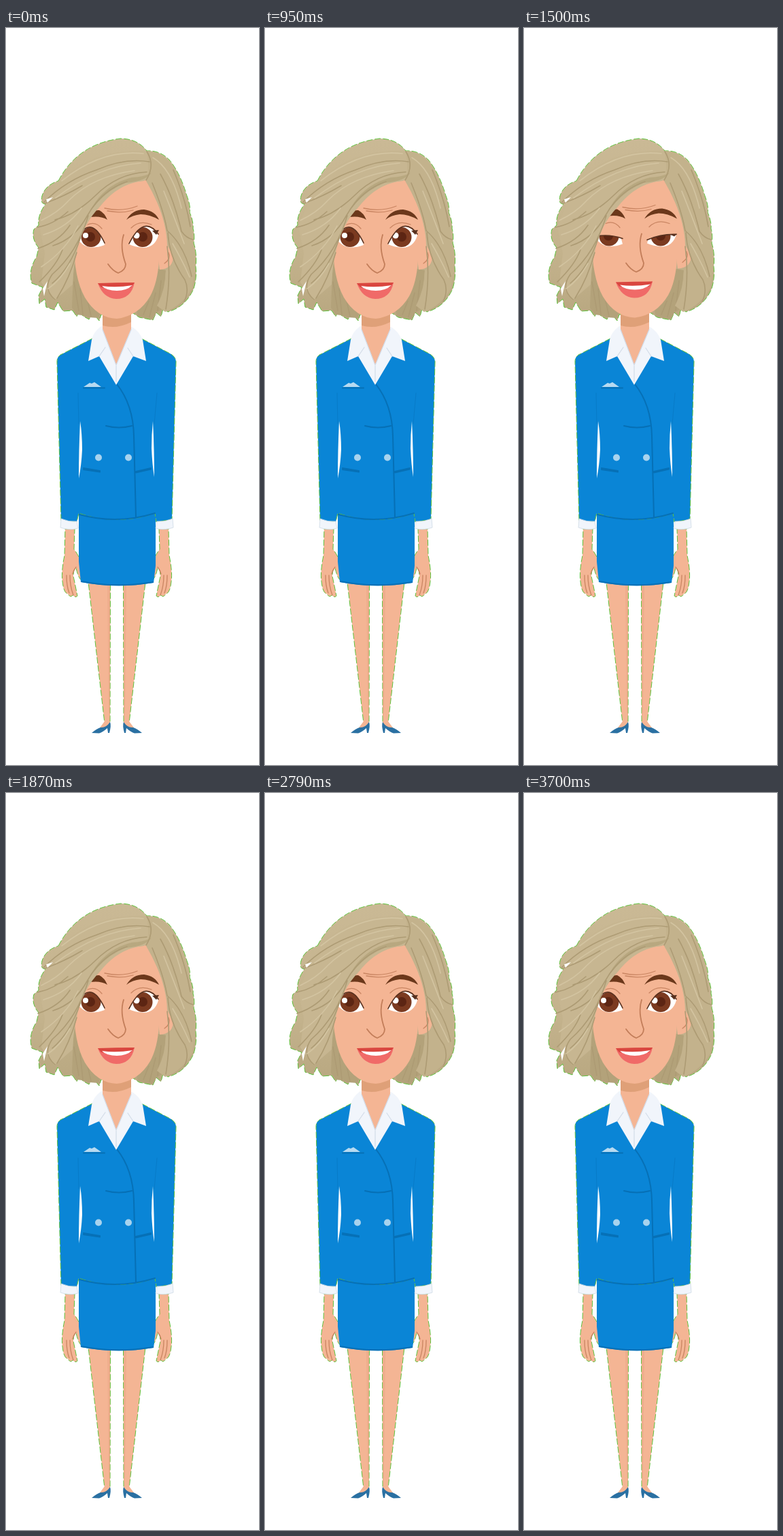
These frames come from a looping animation (372x1080 px, 3.8 s). An HTML page:

```html
<!DOCTYPE html>
<html lang="en">
<head>
<meta charset="utf-8">
<style>
  html, body { margin: 0; width: 100%; height: 100%; overflow: hidden; background: #fff; }
  svg { display: block; width: 100%; height: 100%; }
  .skin { fill: #f4b594; }
  .blue { fill: #0a85d6; }
  .white { fill: #f1f5fb; }
  .line { fill: none; stroke-linecap: round; stroke-linejoin: round; }
  .fringe { stroke: #5fc23c; stroke-width: 1; stroke-dasharray: 9 3; }
  .seam { stroke: #0670b6; stroke-width: 2; }
  .crease { stroke: #c98562; stroke-width: 1.3; }
  .dark { stroke: #ad9b74; stroke-width: 1.6; }
  .light { stroke: #d3c4a1; stroke-width: 1.6; }
</style>
</head>
<body>
<svg viewBox="0 0 372 1080">
  <defs>
    <linearGradient id="hair" x1="0" y1="0" x2="0" y2="1">
      <stop offset="0" stop-color="#cab995"/>
      <stop offset=".6" stop-color="#c4b38d"/>
      <stop offset="1" stop-color="#b8a780"/>
    </linearGradient>
    <g id="limbs">
      <path class="skin fringe" d="M121 812H153.500L153 1019H145Z"/>
      <path d="M149 815H153V1015L151 1000Z" fill="#eaa583" opacity=".5"/>
      <path class="skin fringe" d="M87 734H101L100 764Q110 776 112 794L114 811Q107 810 103 791Q99 793 99 803L105 832Q103 836 98 831Q95 836 91 829Q85 829 83 811Q81 797 86 773Z"/>
      <path class="line crease" d="M89 802Q89 818 93 828M94 802Q94 818 99 831M98 800Q99 795 103 790"/>
      <path class="skin" d="M145 1016L136 1028L152 1024L153 1016Z"/>
      <path d="M126 1033Q133 1027 139 1025Q147 1026 153 1017Q155 1022 152 1033H150L149 1026Q142 1032 137 1033.500Z" fill="#2a70a2"/>
    </g>
  </defs>

  <!-- Back hair -->
  <path class="fringe" fill="url(#hair)" d="M77 224Q105 170 168 162Q193 162 207 180Q226 179 240 193Q256 212 266 246Q272 262 270 270Q276 284 275 294Q278 304 276 315Q281 330 279 350Q281 365 276 382Q264 409 238 416L231 411L228 423L221 417L216 428L196 424L184 416L140 420L137 429L128 418L122 427L113 422L108 413L104 423L98 414L84 415L76 402L71 413L59 409L57 397L49 404L48 392L54 380L38 374Q32 356 45 335L48 322Q37 309 41 295L48 289Q46 275 58 258Q50 258 53 246Q58 230 77 224Z"/>
  <path d="M100 330L97 410L104 420L112 421L122 424L136 425L145 405L190 405L194 422L216 427L221 417L230 412L235 355Z" fill="#b3a27a"/>
  <path class="line dark" d="M100 372L107 414M109 382L113 420M120 400L125 422M228 370L223 414M220 388L211 423M210 400L202 420"/>

  <use href="#limbs"/>
  <use href="#limbs" transform="matrix(-1 0 0 1 326 0)"/>

  <!-- Outfit -->
  <path class="blue" d="M107 708H220V788L217 813Q163 822 110 812L107 782Z"/>
  <path class="line seam" d="M111 811Q163 821 216 812"/>
  <path class="blue fringe" d="M127 455L84 477Q75 480 75 489L81 722L104 724L107 711Q163 730 219 711L221 724L244 720L250 489Q250 483 243 478L199 455L163 500Z"/>
  <path d="M109 576Q112 595 112 618Q111 640 107 660Q107 620 109 576ZM216 576Q214 595 214 616Q215 640 218 658Q218 620 216 576Z" fill="#fff"/>
  <path class="line seam" d="M108 713Q163 728 219 711M163 522Q187 552 188 598L191 717M147 583Q166 588 185 583M114 645L138 649M191 650L213 645"/>
  <path class="line seam" d="M114 647L138 650.500M191 651.500L213 646.500M114 527.500H145"/>
  <path class="line" d="M106 535L107 580M222 535L218 580" stroke="#087bc8"/>
  <path d="M114 526L123 520L126 521L130 519L140 526Z" fill="#b7daf1"/>
  <circle cx="136" cy="629.500" r="5" fill="#a8d3ee"/>
  <circle cx="180" cy="629.500" r="5" fill="#a8d3ee"/>
  <path class="white" id="cuff" d="M81 719Q92 724 104 723L106 733Q94 737 80 732Z" stroke="#cfdae5" stroke-width=".8"/>
  <use href="#cuff" transform="matrix(-1 0 0 1 326 0)"/>

  <!-- Neck and collar -->
  <path class="white" d="M140 437Q128 446 126 457L121 488L137 481L162 523L187 481L206 488L201 457Q196 444 185 438Z"/>
  <path class="skin" d="M142 405H184V442L162 494L142 442Z"/>
  <path d="M142 405H184V431Q162 442 142 436Z" fill="#dfa078"/>
  <path class="line" d="M142 442L162 494L184 442M137 481L146 468M187 481L179 469M162 495V518" stroke="#d3dce8" stroke-width="1.200"/>

  <!-- Face -->
  <g id="face">
    <path class="skin" d="M222 321Q243 313 246 332Q247 353 226 354Z"/>
    <path class="line crease" d="M239 329Q243 338 233 345"/>
    <path class="skin" d="M207 215L150 235L100 300Q98 363 116 395Q134 425 163 426Q195 422 212 393Q223 373 225 340L240 320V270Z"/>
    <path class="line crease" d="M145 264Q170 270 193 261M149 268Q170 272 187 267"/>
    <g fill="#fff">
      <path d="M105 309Q107 288 125 290Q139 293 145 318Q132 323 121 321Q111 318 105 309Z"/>
      <path d="M181 317Q187 291 203 290Q219 293 224 304Q219 321 203 322Q189 321 181 317Z"/>
    </g>
    <g fill="#7b3a20">
      <circle cx="125" cy="306.500" r="14.500"/><circle cx="201" cy="306.500" r="14.500"/>
    </g>
    <g fill="#5c2513">
      <circle cx="124" cy="306" r="7"/><circle cx="201" cy="306" r="7"/>
    </g>
    <g id="glints" fill="#fff">
      <circle cx="117" cy="304" r="4"/><circle cx="192" cy="304" r="4.500"/>
    </g>
    <g id="lids"></g>
    <path class="line crease" d="M184 293Q196 281 214 288M120 288Q132 283 141 294"/>
    <g fill="#6b381b">
      <path d="M124 268L137 267Q145 271 149 281Q140 275 124 277Z"/>
      <path d="M177 281Q186 266 203 266Q219 268 225 281Q211 273 198 273Q186 274 177 281Z"/>
    </g>
    <path class="line" d="M173 303Q167 321 176 346Q176 355 165 359Q157 356 150 346" stroke="#c27d59" stroke-width="1.800"/>
    <path d="M135 374Q162 375 189 373Q184 397 162 397Q143 396 135 374Z" fill="#f06a68"/>
    <path d="M135 374Q162 373 189 373L184 380Q162 382 140 380Z" fill="#d9463f"/>
    <path d="M141 378Q162 381 186 377Q177 385 163 385Q148 385 141 378Z" fill="#fff"/>
  </g>

  <!-- Front hair -->
  <path fill="#c7b691" d="M207 180L214 213Q208 226 195 225Q162 231 138 262Q114 286 105 324Q99 348 98 376L71 399L52 373L57 330L49 290L65 252L85 220Q129 177 207 180Z"/>
  <path fill="#c3b28c" d="M207 180Q226 181 239 194Q255 213 265 247L270 270L275 315L278 350L274 381Q259 407 234 416L222 407Q235 382 235 354Q249 349 245 333L237 318Q236 275 206 224Q212 215 207 180Z"/>
  <path fill="#b09e76" d="M214 212Q205 225 176 227Q144 239 121 273Q141 230 185 219Q204 218 214 212Z" opacity=".6"/>
  <path class="line dark" d="M207 181Q220 201 206 223M211 196Q174 190 133 208Q88 223 55 256M207 211Q164 213 131 246Q102 274 72 281M178 225Q140 238 119 276Q101 309 69 319M121 275Q105 329 68 361Q53 382 72 398M110 306Q94 353 68 374M104 329Q94 366 75 396M46 292Q70 288 91 269M47 323Q78 313 94 289M57 257Q85 247 112 231M49 372Q75 347 83 325M215 227Q232 268 237 297Q263 319 273 364M227 214Q247 250 258 298Q265 308 275 310M238 300Q240 337 263 369Q270 384 262 401M237 320Q243 363 235 412M246 208Q264 250 271 291"/>
  <path class="line light" d="M202 184Q141 177 82 224M198 198Q135 202 73 249M189 209Q128 217 92 253Q77 270 52 282M111 264Q91 292 55 303M106 290Q88 326 52 350M94 345Q80 370 62 382M216 190Q244 206 258 264M232 239Q246 274 262 316M245 316Q260 342 270 365"/>
  <path d="M54 382L61 371L56 393ZM59 251L69 248L61 256Z" fill="#fff"/>
</svg>
<script>
  const LOOP = 3800, BLINK = 1500, HALF_WIDTH = 150;
  const [face, lids, glints] = ['face', 'lids', 'glints'].map(id => document.getElementById(id));

  function lid(x0, y0, x1, y1, close) {
    const bend = 273 + 30 * close;
    const edge = `M${x0} ${y0}Q${(x0 + x1) / 2} ${bend} ${x1} ${y1}`;
    return `<path class="skin" d="${edge}V284H${x0}Z"/>
      <path class="line" d="${edge}" stroke="#57301e" stroke-width="1.6"/>`;
  }

  function draw(now) {
    const offset = (now % LOOP - BLINK) / HALF_WIDTH;
    const close = Math.abs(offset) < 1 ? (1 + Math.cos(Math.PI * offset)) / 2 : 0;
    lids.innerHTML = lid(105, 307, 145, 315 - 5 * close, close) +
      lid(181, 316 - 4 * close, 224, 302 + 2 * close, close) +
      `<path d="M215 ${297 + 7 * close}L225 ${296 + 7 * close}L221 ${303 + 4 * close}Z" fill="#57301e"/>`;
    glints.setAttribute('opacity', 1 - close);
    face.setAttribute('transform', `translate(0 ${-1.5 * close})`);
    requestAnimationFrame(draw);
  }
  draw(performance.now());
</script>
</body>
</html>
```
